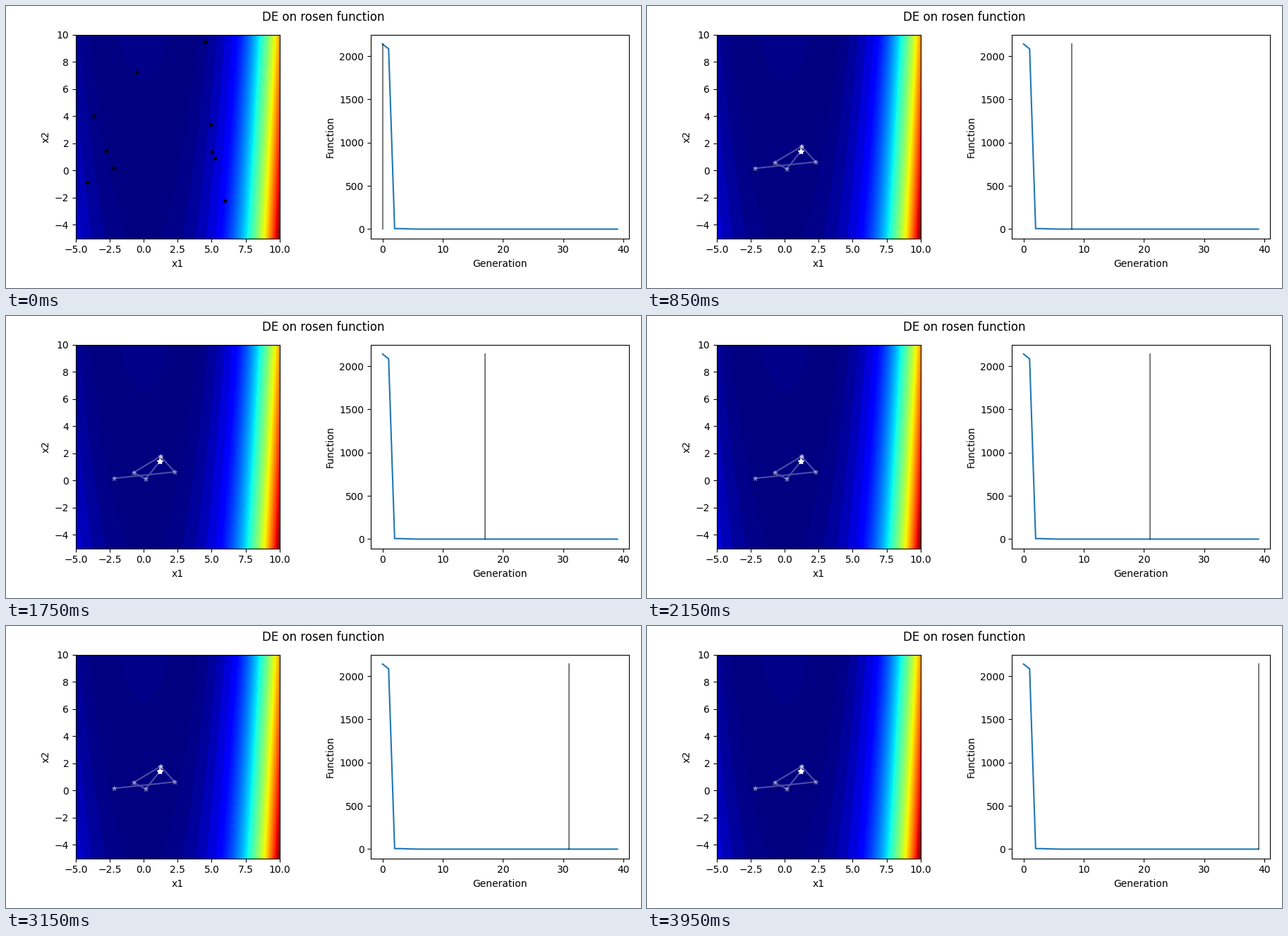
These frames come from a looping animation (900 by 400 pixels, 4000 ms). A matplotlib script:

```python
import numpy as np
import matplotlib.pyplot as plt
from matplotlib.animation import FuncAnimation

W, H = 900, 400
GENS = 40
rng = np.random.default_rng(4)


def rosen(x, y):
    return 100 * (y - x**2) ** 2 + (1 - x) ** 2


# Best member of each generation; the optimum holds until the end
best = np.full((GENS, 2), (1.18, 1.41))
best[:6] = [(-2.185, 0.16), (2.28, 0.635), (1.24, 1.78), (1.24, 1.78),
            (-0.75, 0.59), (0.15, 0.12)]
cost = rosen(*best.T)

# The leading member comes first, the others follow from left to right
start = np.array([best[0], (-4.15, -0.88), (-3.63, 4.0), (-2.75, 1.45),
                  (-0.52, 7.22), (4.53, 9.5), (4.9, 3.4), (5.05, 1.35),
                  (5.25, 0.9), (5.95, -2.2)])
leave = rng.integers(1, 6, len(start))
valley_x = np.linspace(-1.2, 2.2, len(start))
valley = np.column_stack([valley_x, valley_x**2])


def population(g):
    """Members hop into the valley, then join the best as the reach shrinks."""
    reach = 2.8 * np.sqrt(max(0, 1 - (g / 24) ** 2))
    joined = abs(valley_x - best[-1, 0]) > reach
    pts = np.where(joined[:, None], best[g], valley)
    pts = np.where((g < leave)[:, None], start, pts)
    pts[0] = best[g]
    return pts


def add_axes(left, right, xlabel, ylabel):
    top, bottom = 40.9, 329.6
    ax = fig.add_axes([left / W, 1 - bottom / H,
                       (right - left) / W, (bottom - top) / H])
    ax.set_xlabel(xlabel)
    ax.set_ylabel(ylabel)
    return ax


fig = plt.figure(figsize=(W / 100, H / 100), dpi=100, facecolor="white")
fig.suptitle("DE on rosen function", y=0.983)

# Search space, with bands that are wide in the valley and fine on the slope
ax1 = add_axes(99, 387.7, "x1", "x2")
side = np.linspace(-5, 10, 301)
x, y = np.meshgrid(side, side)
z = rosen(x, y)
levels = np.r_[np.arange(6) ** 2, 28:257:3] / 256
shades = plt.get_cmap("jet")((levels[:-1] + levels[1:]) / 2)
ax1.contourf(x, y, z, levels=levels * (z.max() + 1), colors=shades,
             extend="neither")
ax1.set(xlim=(-5, 10), ylim=(-5, 10),
        xticks=np.arange(-5, 10.1, 2.5), yticks=range(-4, 11, 2))
path, = ax1.plot([], [], "w-*", alpha=0.3, ms=5)
star, = ax1.plot([], [], "w*", ms=6)
dots, = ax1.plot([], [], "k.", ms=6)

# Convergence
ax2 = add_axes(517.1, 883.3, "Generation", "Function")
ax2.plot(cost)
cursor, = ax2.plot([0, 0], [cost.min(), cost.max()], "k", alpha=0.5)


def update(i):
    # Even frames reveal the population, odd ones advance the best path
    g = max(i - 1, 0) // 2
    seen = best[:g + 1] if i else best[:0]
    members = population(i // 2) if i % 2 == 0 else best[:0]
    path.set_data(*seen.T)
    star.set_data(*seen[-1:].T)
    dots.set_data(*members.T)
    cursor.set_xdata([g, g])
    return path, star, dots, cursor


anim = FuncAnimation(fig, update, frames=2 * GENS, interval=50,
                     repeat=True, repeat_delay=0, blit=False)
plt.show()
```
